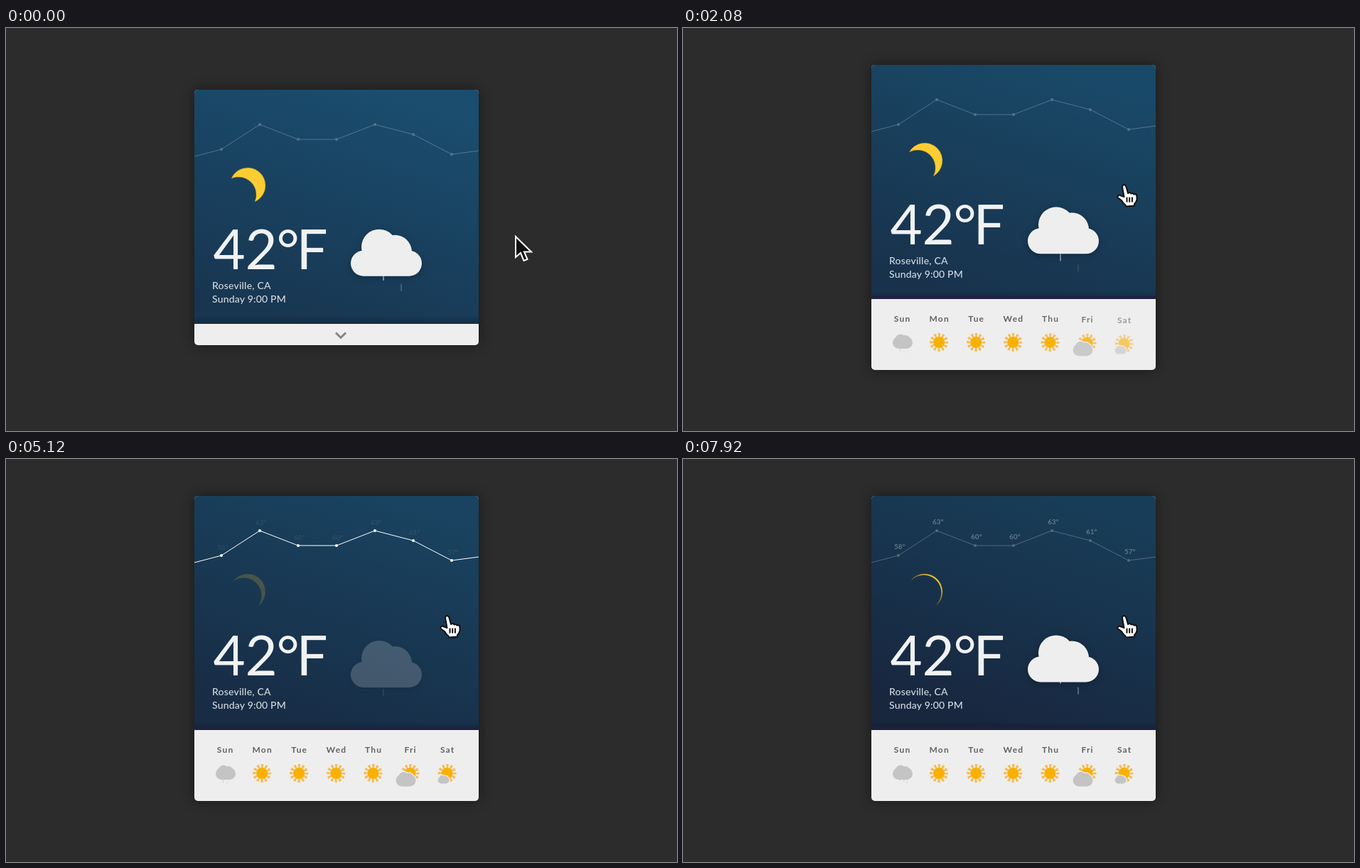
Recreate the animation shown at these times as an HTML page. Size 944x568 px, loop 8 s.

```html
<!DOCTYPE html>
<html lang="en">
<head>
<meta charset="utf-8">
<title>Weather card</title>
<style>
html, body { margin: 0; width: 100%; height: 100%; overflow: hidden; background: #2c2c2c; }
svg { display: block; width: 944px; height: 568px; font-family: Lato, "Open Sans", sans-serif; }
#box { filter: drop-shadow(0 0 9px rgba(0,0,0,.45)); }
#cloud { filter: drop-shadow(0 2px 5px rgba(0,0,0,.28)); }
.info { font-size: 14px; font-weight: 500; letter-spacing: .2px; fill: #d3dae1; }
.day { font-size: 12px; font-weight: 700; letter-spacing: 1.2px; fill: #626262; text-anchor: middle; }
.temp { font-size: 10px; font-weight: 700; fill: #fff; }
</style>
</head>
<body>
<svg viewBox="0 0 944 568">
  <defs>
    <linearGradient id="sky" gradientUnits="userSpaceOnUse" x1="255" y1="0" x2="145" y2="330">
      <stop id="skyTop"/><stop id="skyLow" offset="1"/>
    </linearGradient>
    <linearGradient id="fade" x2="0" y2="1">
      <stop stop-opacity="0"/><stop offset="1" stop-opacity=".22"/>
    </linearGradient>
    <clipPath id="clip"><rect id="clipBox" width="400" rx="5"/></clipPath>
    <!-- both clouds stand on y = 0 -->
    <g id="puff">
      <rect y="-36" width="100" height="36" rx="18"/>
      <circle cx="40" cy="-41" r="25"/><circle cx="62" cy="-34" r="24"/>
    </g>
    <g id="mini">
      <rect y="-17" width="28" height="17" rx="8.5"/>
      <circle cx="11" cy="-13.5" r="7"/><circle cx="18" cy="-12.5" r="6.5"/>
    </g>
    <g id="sun">
      <circle r="10.5" fill="none" stroke="#f4bd58" stroke-width="5" stroke-dasharray="3.1 2.4" stroke-dashoffset="1.55"/>
      <circle r="8" fill="#f9b000"/>
    </g>
  </defs>
  <g id="card">
    <rect id="box" width="400" rx="5" fill="#eee"/>
    <g clip-path="url(#clip)">
      <rect width="400" height="330" fill="url(#sky)"/>
      <rect y="318" width="400" height="12" fill="url(#fade)"/>
      <rect id="strip" y="326" width="400" height="4" fill="#211f43"/>
      <g id="chart" stroke="#fff" fill="#fff"></g>
      <g id="temps"></g>
      <path id="moon" fill="#fbcd31" stroke="#8a7030" stroke-opacity=".45"/>
      <text x="26.5 71.5 115.5 143.5" y="252.8" font-size="78" fill="#f0f2f4">42°F</text>
      <text class="info" x="25" y="281">Roseville, CA</text>
      <text class="info" x="25" y="300">Sunday 9:00 PM</text>
      <g id="rainCloud">
        <g id="rain" stroke="#c9dbe8" stroke-width="1.6"></g>
        <use id="cloud" href="#puff" fill="#eee"/>
      </g>
      <path id="chevron" d="M-7-3.5L0 3.5L7-3.5" fill="none" stroke="#858585" stroke-width="3"/>
      <g id="week"></g>
    </g>
  </g>
  <path id="arrow" d="M0 0V29L7 23L11.5 34L16.5 32L12 21.5H22Z" fill="#111" stroke="#fff" stroke-width="2"/>
  <g id="hand" stroke="#111" stroke-width="2" stroke-linejoin="round">
    <path d="M0 3Q0 0 2.5 0Q4.5 0 5.5 3L8 12Q11 10 12.5 12.5Q15 11 16.5 13.5Q20.5 12 20.5 17V21Q19.5 25 17 27V29.5L5.5 30.5L4 28Q1 26-1 22L-6.5 18Q-7 15-4 14.5L2.5 17Z" fill="#fff"/>
    <path d="M6.5 17.5v7M10.2 17.5v7M13.9 17.5v7" fill="none"/>
  </g>
</svg>
<script>
const LOOP = 8000, HOVER = 920, CHART_ON = 4780, CHART_OFF = 7420;
const $ = id => document.getElementById(id);
const set = (el, attrs) => { for (const k in attrs) el.setAttribute(k, attrs[k]); };
const clamp = x => Math.min(1, Math.max(0, x));
const mod = (a, b) => (a % b + b) % b;
const move = (x, y) => `translate(${x} ${y})`;

// cubic-bezier(.25, .1, .25, 1)
function ease(x) {
  if (x <= 0) return 0;
  if (x >= 1) return 1;
  let a = 0, b = 1, u;
  for (let i = 0; i < 18; i++) {
    u = (a + b) / 2;
    const v = 1 - u;
    if (.75 * v * v * u + .75 * v * u * u + u ** 3 < x) a = u; else b = u;
  }
  return .3 * (1 - u) ** 2 * u + 3 * (1 - u) * u * u + u ** 3;
}
const tween = (t, start, length) => ease((t - start) / length);

function mix(a, b, k) {
  return `rgb(${a.map((v, i) => v + (b[i] - v) * k)})`;
}

// temperature chart
const temps = [58, 63, 60, 60, 63, 61, 57];
const points = temps.map((v, i) => [38 + 54 * i, 49 + 7 * (63 - v)]);
$('chart').innerHTML =
  `<polyline fill="none" points="0,94 ${points.join(' ')} 400,86"/>` +
  points.map(([x, y]) => `<circle cx="${x}" cy="${y}" r="2" stroke="none"/>`).join('');
$('temps').innerHTML = points.map(([x, y], i) =>
  `<text class="temp" x="${x - 6}" y="${y - 12}">${temps[i]}°</text>`).join('');

// forecast row
const sun = '<use href="#sun" y="391"/>';
const mini = (x, y, scale, edge = 0) =>
  `<g transform="translate(${x} ${y}) scale(${scale})">` +
  (edge ? `<use href="#mini" fill="#eee" stroke="#eee" stroke-width="${edge / scale}"/>` : '') +
  '<use href="#mini" fill="#c4c4c4"/></g>';
const icons = [
  '<g id="drizzle" stroke="#bac2ca"></g>' + mini(-13, 400, 1),
  sun, sun, sun, sun,
  sun + mini(-20, 409.5, 1, 2.5),
  sun + mini(-13, 405.5, .57, 2.5)
];
$('week').innerHTML = 'Sun Mon Tue Wed Thu Fri Sat'.split(' ').map((name, i) =>
  `<g><text class="day" x=".6" y="362">${name}</text>${icons[i]}</g>`).join('');
const days = [...$('week').children];

// drops leave the cloud base, fall and fade once a second
function drop(x, base, age, speed, length) {
  const low = base + speed * age;
  return `<path d="M${x} ${low - length}V${low}" opacity="${clamp(1 - 1.7 * age)}"/>`;
}

function crescent(cx, cy, r, d) {
  const h = Math.sqrt(r * r - d * d / 2) / Math.SQRT2;
  const x = cx - d / 2, y = cy + d / 2;
  const arc = `A${r} ${r} 0 `;
  return `M${x - h} ${y - h}${arc}1 1 ${x + h} ${y + h}${arc}0 0 ${x - h} ${y - h}Z`;
}

function draw(t) {
  const s = t / 1000, day = t / LOOP;
  const open = tween(t, HOVER, 1000);
  const height = 360 + 70 * open;
  set($('card'), { transform: move(265, 87 - 35 * open) });
  set($('box'), { height });
  set($('clipBox'), { height });
  set($('strip'), { opacity: open });
  set($('skyTop'), { 'stop-color': mix([26, 77, 110], [24, 61, 88], day) });
  set($('skyLow'), { 'stop-color': mix([24, 54, 81], [24, 38, 62], day) });

  const hide = tween(t, HOVER, 400);
  set($('chevron'), { transform: move(206, 346 + 4 * hide), opacity: 1 - hide });
  days.forEach((el, i) => {
    const k = tween(t, 1310 + 100 * i, 500);
    set(el, { transform: move(43 + 52.1 * i, 5 * (1 - k)), opacity: k });
  });

  // chart highlight dims the sky objects, labels follow later
  const focus = tween(t, CHART_ON, 300) - tween(t, CHART_OFF, 300);
  const label = tween(t, CHART_ON + 300, 500) - tween(t, CHART_OFF + 300, 500);
  set($('chart'), { opacity: .25 + .75 * focus });
  set($('temps'), { opacity: label, transform: move(0, 4 * (1 - label)) });
  set($('moon'), { d: crescent(75, 135, 25, 13 - 1.46 * s), opacity: 1 - .8 * focus });

  // one bob of 3.2 s every 4 s
  const bob = 4.1 * (1 - Math.cos(2 * Math.PI * Math.min(1, mod(s + .3, 4) / 3.2)));
  set($('rainCloud'), { transform: move(220, 262 + bob), opacity: 1 - .8 * focus });
  const a = mod(s + .12, 1), b = mod(s + .42, 1), c = mod(s + .27, 1);
  $('rain').innerHTML = drop(46, 0, a, 50, 10) + drop(71, 0, b, 50, 10);
  $('drizzle').innerHTML = drop(-2.5, 401, a, 14, 6) + drop(3, 401, c, 14, 4) + drop(7.5, 401, b, 14, 7);

  const k = clamp((t - 60) / 1540), path = k * k * (3 - 2 * k);
  const at = move(717 - 99 * path, 294 - 73 * path ** 1.6);
  const inside = t >= 900;
  set($('arrow'), { transform: at, visibility: inside ? 'hidden' : 'visible' });
  set($('hand'), { transform: at, visibility: inside ? 'visible' : 'hidden' });
}

function tick() {
  draw(performance.now() % LOOP);
  requestAnimationFrame(tick);
}
tick();
</script>
</body>
</html>
```
